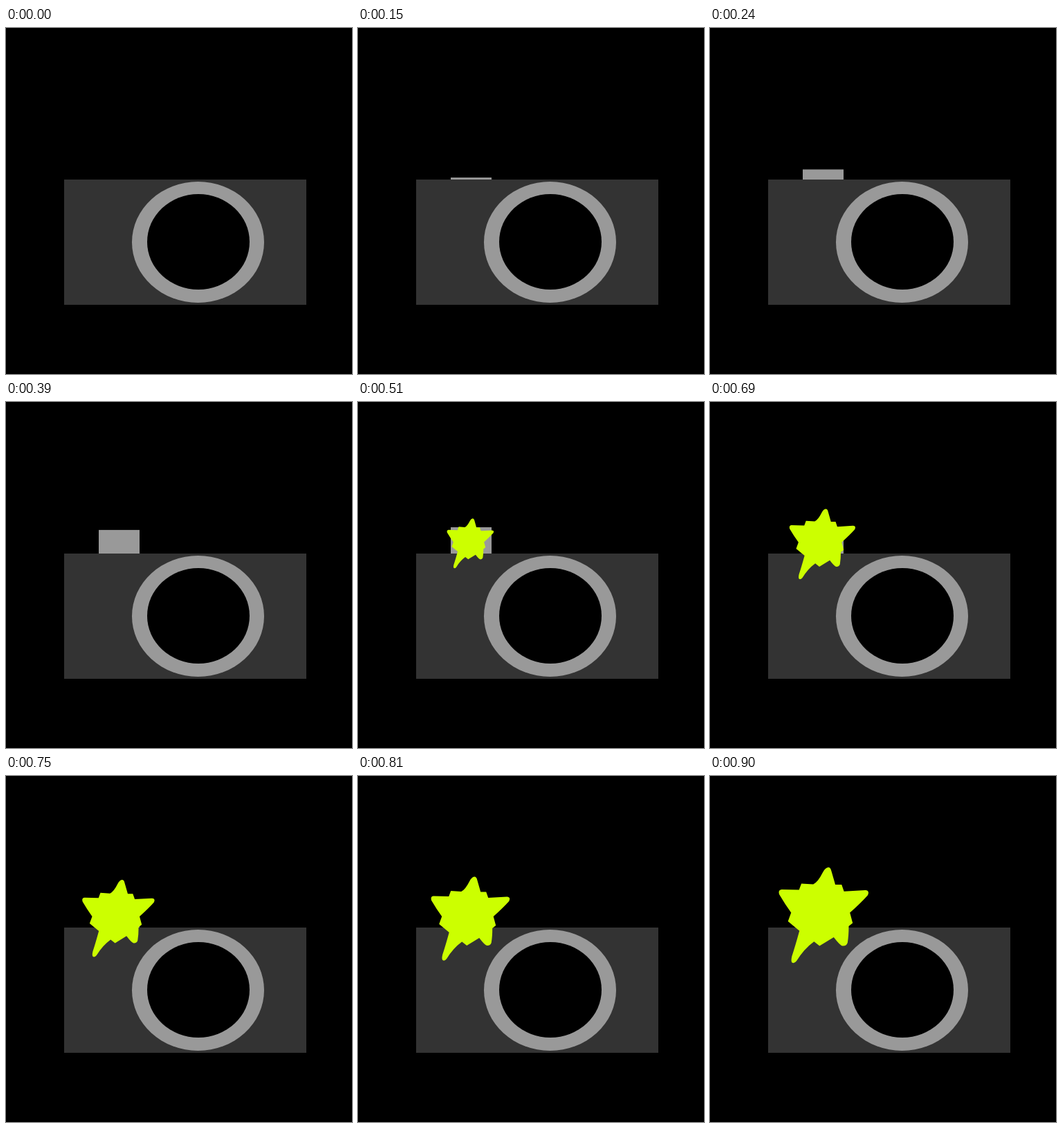
These frames come from a looping animation (500 by 500 pixels, 930 ms). An HTML page:

```html
<!DOCTYPE html>
<html>
<head>
<meta charset="utf-8">
<title>Camera flash</title>
<style>
  html, body { margin: 0; width: 100%; height: 100%; overflow: hidden; background: #000; }
  svg { display: block; width: 500px; height: 500px; }
</style>
</head>
<body>
<svg viewBox="0 0 500 500">
  <rect id="flash" x="134" y="220" width="59" height="39" fill="#999"/>
  <rect x="84" y="219" width="350" height="181" fill="#333"/>
  <ellipse cx="277.5" cy="309.5" rx="95.5" ry="87.5" fill="#999"/>
  <ellipse cx="278" cy="309" rx="74" ry="69"/>
  <path id="star" fill="#cf0" d="M168 145.5 Q171 145.5 172 150 L177 167.500 H185 L188 176
    L215 174.500 Q221 175 218 181 Q210 190 195.500 203 L199 216 L194 220
    Q194 232 192.500 241 Q191 245.500 186 245 Q183 244.500 175 234 L157 245 L150 239.500
    Q137 249 128 264 Q125 268 122 266 Q120.500 264 122 258 Q126 246 131.500 226
    L117 214 L121 203 Q113 192 106 180 Q104 174 109 173.500 L131 174 L134 166 L149 167
    Q155 164 161 152 Q164 146 168 145.500 Z"/>
</svg>
<script>
  const LOOP = 930, STEP = 30;
  const flash = document.getElementById('flash');
  const star = document.getElementById('star');
  const clamp = v => Math.min(1, Math.max(0, v));

  function draw(ms) {
    const tick = Math.floor(ms % LOOP / STEP);

    // The flash unit rises out of the body.
    flash.setAttribute('y', 220 - 39 * clamp((tick - 4) / 10));

    // The burst grows steadily, holds, then jumps larger.
    const grow = clamp((tick - 15) / 12);
    const jump = tick >= 30;
    const scale = jump ? 1.14 : 0.514 + 0.486 * grow;
    const x = jump ? 164 : 162.2;
    const y = jump ? 201 : 203.8 + 2.2 * grow;
    star.setAttribute('visibility', tick >= 15 ? 'visible' : 'hidden');
    star.setAttribute('transform', `translate(${x} ${y}) scale(${scale}) translate(-162 -206)`);
  }

  const start = performance.now();
  function frame() {
    draw(performance.now() - start);
    requestAnimationFrame(frame);
  }
  frame();
</script>
</body>
</html>
```
